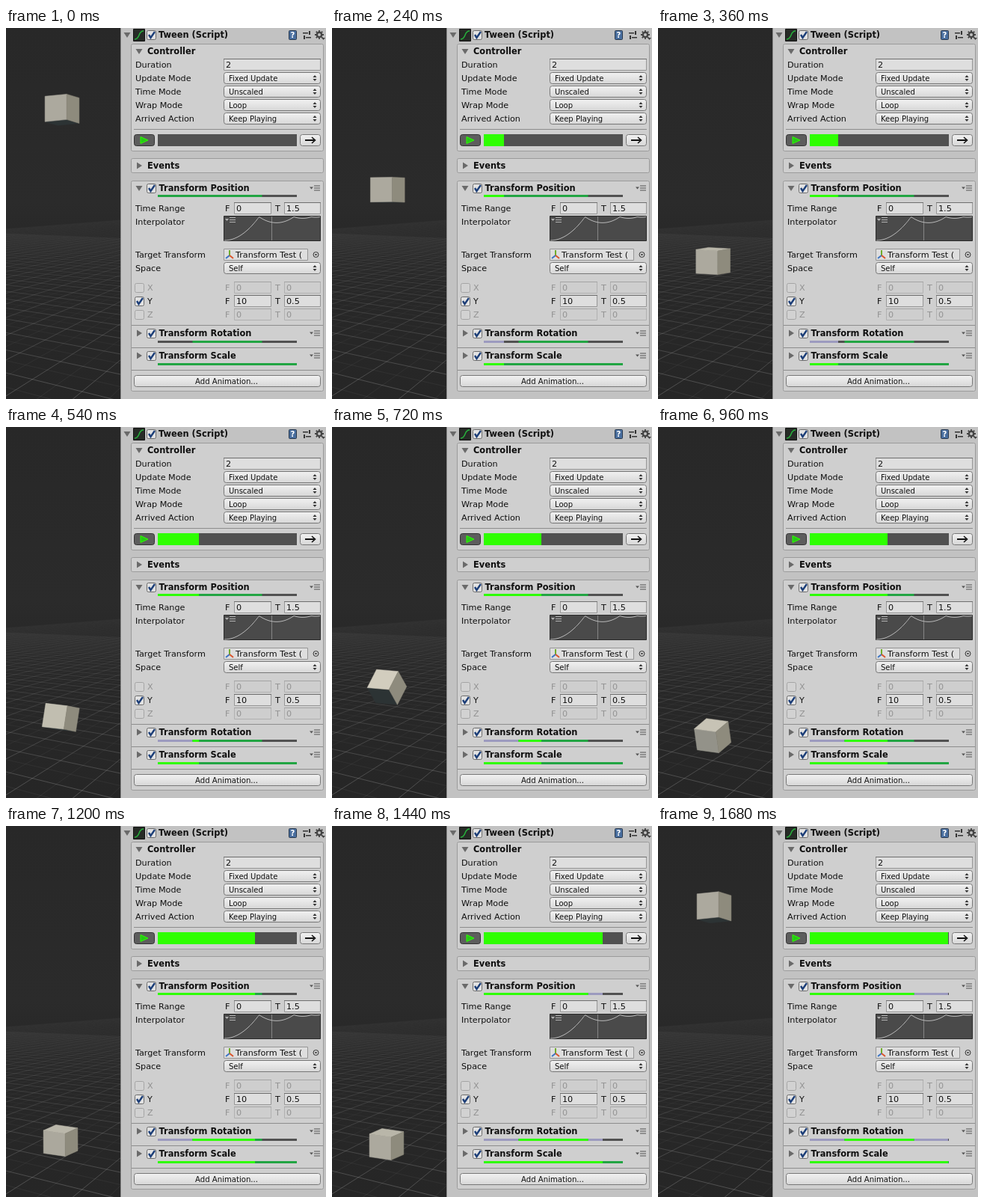
Write an HTML page with a canvas that moves like this. It is 428 by 496 pixels and loops after 1740 ms.

```html
<!DOCTYPE html>
<html lang="en">
<head>
<meta charset="utf-8">
<title>Tween inspector</title>
<style>
html, body { margin: 0; width: 100%; height: 100%; overflow: hidden; background: #292929; }
canvas { display: block; }
</style>
</head>
<body>
<canvas id="stage" width="428" height="496"></canvas>
<script>
const W = 428, H = 496, LOOP = 1740, STEP = 60, PANEL = 154, HORIZON = 237;
const LIME = '#2eff00', GREEN = '#22a543', LAVENDER = '#9c9abf', SLATE = '#515151';
const ctx = document.getElementById('stage').getContext('2d');
const backdrop = document.createElement('canvas');
backdrop.width = W;
backdrop.height = H;
let g = backdrop.getContext('2d');

function rect(x, y, w, h, fill) {
  g.fillStyle = fill;
  g.fillRect(x, y, w, h);
}

function path(points, fill, stroke, width = 1, closed = true) {
  g.beginPath();
  points.forEach(([x, y]) => g.lineTo(x, y));
  if (closed) g.closePath();
  if (fill) { g.fillStyle = fill; g.fill(); }
  if (stroke) { g.strokeStyle = stroke; g.lineWidth = width; g.stroke(); }
}

function box(x, y, w, h, fill, border, radius = 0) {
  g.beginPath();
  g.roundRect(x + .5, y + .5, w - 1, h - 1, radius);
  g.fillStyle = fill;
  g.fill();
  g.strokeStyle = border;
  g.lineWidth = 1;
  g.stroke();
}

function text(str, x, y, { size = 11.2, bold = false, color = '#101010', align = 'left' } = {}) {
  g.font = `${bold ? 'bold ' : ''}${size}px "DejaVu Sans", sans-serif`;
  g.fillStyle = color;
  g.textAlign = align;
  g.fillText(str, x, y);
}

const title = (str, x, y) => text(str, x, y, { size: 11.4, bold: true });

function foldout(x, y, open) {
  path(open ? [[x - 4.5, y - 3], [x + 4.5, y - 3], [x, y + 4]]
            : [[x - 3, y - 4.5], [x + 4, y], [x - 3, y + 4.5]], '#6a6a6a');
}

function checkbox(x, y, on, dim) {
  box(x, y, 13, 13, dim ? '#d2d2d2' : '#e2e2e2', dim ? '#a4a4a4' : '#6b6b6b', 2);
  if (on) path([[x + 3, y + 6], [x + 5.5, y + 10], [x + 11, y + 2]], null, '#1c3e78', 2.4, false);
}

function field(str, x, y, w, dim) {
  box(x, y, w, 16, dim ? '#cecece' : '#dedede', dim ? '#b0b0b0' : '#969696');
  rect(x, y, w, 1, dim ? '#a3a3a3' : '#6e6e6e');
  text(str, x + 3, y + 12, { color: dim ? '#939393' : '#101010' });
}

function button(x, y, w, h) {
  const shade = g.createLinearGradient(0, y, 0, y + h);
  shade.addColorStop(0, '#f2f2f2');
  shade.addColorStop(1, '#d6d6d6');
  box(x, y, w, h, shade, '#777', 3);
}

function popup(label, value, y) {
  text(label, 173, y + 12);
  button(291, y, 130, 16);
  text(value, 298, y + 11.5, { size: 10 });
  path([[410.5, y + 7], [413, y + 4], [415.5, y + 7]], '#333');
  path([[410.5, y + 9], [413, y + 12], [415.5, y + 9]], '#333');
}

function rangeFields(from, to, y, dim) {
  const color = dim ? '#939393' : '#101010';
  text('F', 293, y + 12, { color });
  field(from, 305, y, 50, dim);
  text('T', 360, y + 12, { color });
  field(to, 372, y, 49, dim);
}

function menuIcon(x, y, color) {
  path([[x, y - 1.5], [x + 5, y - 1.5], [x + 2.5, y + 1.5]], color);
  for (const d of [-3, 0, 3]) rect(x + 6, y + d - .5, 8, 1, color);
}

function bounceOut(t) {
  const q = t * 2.75;
  const [mid, base] = q < 1 ? [0, 0] : q < 2 ? [1.5, .75] : q < 2.5 ? [2.25, .9375] : [2.625, .984375];
  return (q - mid) ** 2 + base;
}

function drawGround() {
  const sky = g.createLinearGradient(0, 0, 0, H);
  sky.addColorStop(0, '#282828');
  sky.addColorStop(.47, '#2b2b2b');
  sky.addColorStop(.54, '#292929');
  sky.addColorStop(1, '#262626');
  rect(0, 0, PANEL, H, sky);
  g.save();
  g.beginPath();
  g.rect(0, HORIZON, PANEL, H - HORIZON);
  g.clip();
  const fan = (vanishX, spacing) => {
    for (let k = -60; k <= 60; k++) {
      const alpha = k % 2 ? .06 : .22;
      const fade = g.createLinearGradient(0, HORIZON, 0, H);
      fade.addColorStop(0, 'rgba(150,150,150,0)');
      fade.addColorStop(.3, `rgba(150,150,150,${alpha * .6})`);
      fade.addColorStop(1, `rgba(170,170,170,${alpha * 1.5})`);
      const x = 73 + spacing * k;
      path([[vanishX, HORIZON], [vanishX + (x - vanishX) * 3, HORIZON + 627]], null, fade, 1, false);
    }
  };
  fan(405, 38.7);
  fan(-910, 67);
  g.restore();
}

function drawHeader() {
  foldout(162, 9, true);
  box(170, 1, 16, 17, '#262b26', '#111');
  g.beginPath();
  g.moveTo(172, 15);
  g.bezierCurveTo(180, 15, 176, 4, 184, 4);
  g.strokeStyle = '#27b23c';
  g.lineWidth = 1.5;
  g.stroke();
  checkbox(188, 3, true);
  title('Tween (Script)', 204, 13);
  box(378, 3, 11, 13, '#4a6f9f', '#28384d', 1);
  text('?', 383.5, 13, { size: 10, bold: true, color: '#fff', align: 'center' });
  rect(397, 6, 7, 1.5, '#333');
  rect(405, 4, 2, 5, '#333');
  rect(401, 12, 7, 1.5, '#333');
  rect(398, 10, 2, 5, '#333');
  g.strokeStyle = '#444';
  g.lineWidth = 2.4;
  g.beginPath();
  g.arc(419, 9, 3.2, 0, 7);
  g.stroke();
  for (let i = 0; i < 8; i++) {
    const c = Math.cos(i * Math.PI / 4), s = Math.sin(i * Math.PI / 4);
    path([[419 + 4 * c, 9 + 4 * s], [419 + 6 * c, 9 + 6 * s]], null, '#444', 1.8, false);
  }
  path([[422, 13], [427, 13], [424.5, 16]], '#444');
}

function drawController() {
  box(167, 21, 258, 144, '#cfcfcf', '#9b9b9b', 2);
  foldout(178, 31, true);
  title('Controller', 189, 35);
  text('Duration', 173, 53);
  field('2', 291, 41, 130);
  popup('Update Mode', 'Fixed Update', 59);
  popup('Time Mode', 'Unscaled', 77);
  popup('Wrap Mode', 'Loop', 95);
  popup('Arrived Action', 'Keep Playing', 113);
  rect(171, 135, 250, 1, '#8d8d8d');
  box(171, 142, 28, 16, '#5d5d5d', '#333', 3);
  path([[180, 145.5], [190, 150], [180, 154.5]], '#26c816', '#2eff00');
  button(393, 142, 28, 16);
  path([[400, 150], [412, 150]], null, '#111', 2, false);
  path([[409, 146], [413.5, 150], [409, 154]], null, '#111', 1.6, false);
}

function drawCurve() {
  box(291, 251, 130, 34, '#4a4a4a', '#2b2b2b');
  rect(355, 252, 1, 32, '#858585');
  const points = Array.from({ length: 129 }, (_, i) => [292 + i, 284 - 31.5 * bounceOut(i / 128)]);
  path(points, null, '#b8b8b8', 1, false);
  menuIcon(293, 256.5, '#b5b5b5');
}

function drawAnimations() {
  box(167, 174, 258, 20, '#cfcfcf', '#9b9b9b', 2);
  foldout(178, 184, false);
  title('Events', 189, 188);

  box(167, 204, 258, 282, '#cfcfcf', '#9b9b9b', 2);
  [['Position', 214, true], ['Rotation', 408, false], ['Scale', 438, false]].forEach(([name, y, open]) => {
    foldout(178, y, open);
    checkbox(188, y - 6, true);
    title('Transform ' + name, 204.5, y + 4);
    menuIcon(406, y, '#555');
  });
  for (const y of [397, 427, 457]) rect(168, y, 256, 1, '#8d8d8d');

  text('Time Range', 173, 245);
  rangeFields('0', '1.5', 233);
  text('Interpolator', 173, 263);
  drawCurve();
  text('Target Transform', 173, 307);
  box(291, 295, 113, 16, '#dedede', '#969696');
  path([[299, 304], [299, 297]], null, '#6fae2d', 2, false);
  path([[299, 304], [294, 308]], null, '#3b74c4', 2, false);
  path([[299, 304], [304, 308]], null, '#d8542c', 2, false);
  text('Transform Test (', 307, 307);
  g.strokeStyle = '#333';
  g.lineWidth = 1;
  g.beginPath();
  g.arc(414.5, 303, 3.5, 0, 7);
  g.stroke();
  rect(413.5, 302, 2, 2, '#333');
  popup('Space', 'Self', 313);
  [['X', '0', '0'], ['Y', '10', '0.5'], ['Z', '0', '0']].forEach(([axis, from, to], i) => {
    const y = 339 + 18 * i, dim = axis !== 'Y';
    checkbox(172, y + 2, !dim, dim);
    text(axis, 189, y + 12, { color: dim ? '#939393' : '#101010' });
    rangeFields(from, to, y, dim);
  });
  button(171, 464, 250, 16);
  text('Add Animation...', 295, 476, { size: 10.1, align: 'center' });
}

// Progress strip: the active range is green until played, time outside it turns lavender.
function strip(y, from, to, played) {
  const span = (a, b, color) => b > a && rect(203 + 186 * a, y, 186 * (b - a), 3, color);
  span(0, 1, SLATE);
  span(0, played, LAVENDER);
  span(from, to, GREEN);
  span(from, Math.min(to, played), LIME);
}

function drawCube(progress) {
  const drop = bounceOut(Math.min(1, progress / .75));
  const turn = Math.min(1, Math.max(0, (progress - .25) / .5));
  const angle = Math.PI / 2 * Math.sin(turn * Math.PI / 2);
  const cx = 75 - 2 * drop, cy = 108.5 + 317 * drop;
  const height = 34 - 3.5 * drop, tilt = (cy - HORIZON) / 22;
  const project = (side, up, back) => [
    cx + 33.5 * (.866 * side + .5 * back),
    cy - height * up - tilt * (.866 * back - .5 * side)
  ];
  const corner = (side, phi) =>
    project(side, Math.SQRT1_2 * Math.sin(phi), -Math.SQRT1_2 * Math.cos(phi));
  const quarter = Math.PI / 2, half = Math.PI / 4;

  for (let i = -1; i <= 1; i++) {
    const phi = angle + i * quarter;
    if (.866 * Math.cos(phi) + Math.sin(phi) * tilt / 33 <= 0) continue;
    const light = Math.max(0, Math.cos(phi - .87)) ** .6;
    const shade = [[44, 210], [51, 205], [52, 190]].map(([dark, lit]) => Math.round(dark + (lit - dark) * light));
    const color = `rgb(${shade})`;
    path([corner(-.5, phi - half), corner(.5, phi - half), corner(.5, phi + half), corner(-.5, phi + half)],
      color, color, .5);
  }
  path([0, 1, 2, 3].map(i => corner(.5, angle + half + i * quarter)), '#8e8b7d', '#8e8b7d', .5);
}

// Bar width in pixels at a few moments; playback speed is slightly uneven.
const pace = [[0, 0], [240, 27], [540, 55], [720, 77], [960, 104], [1080, 119], [1200, 130], [1620, 180], [1680, 185]];

function barWidth(time) {
  const i = Math.max(1, pace.findIndex(([t]) => t >= time));
  const [t0, w0] = pace[i - 1], [t1, w1] = pace[i];
  return Math.round(w0 + (w1 - w0) * (time - t0) / (t1 - t0));
}

function draw() {
  const time = Math.floor(performance.now() % LOOP / STEP) * STEP;
  const width = barWidth(time), played = width / 186;
  g.drawImage(backdrop, 0, 0);
  drawCube((played + .014) % 1);
  rect(203, 142, 186, 16, SLATE);
  rect(203, 142, width, 16, LIME);
  strip(223, 0, .75, played);
  strip(418, .25, .75, played);
  strip(448, 0, 1, played);
  requestAnimationFrame(draw);
}

drawGround();
rect(PANEL - 1, 0, W, H, '#8a8a8a');
rect(PANEL, 0, W, H, '#c2c2c2');
drawHeader();
drawController();
drawAnimations();
g = ctx;
draw();
</script>
</body>
</html>
```
